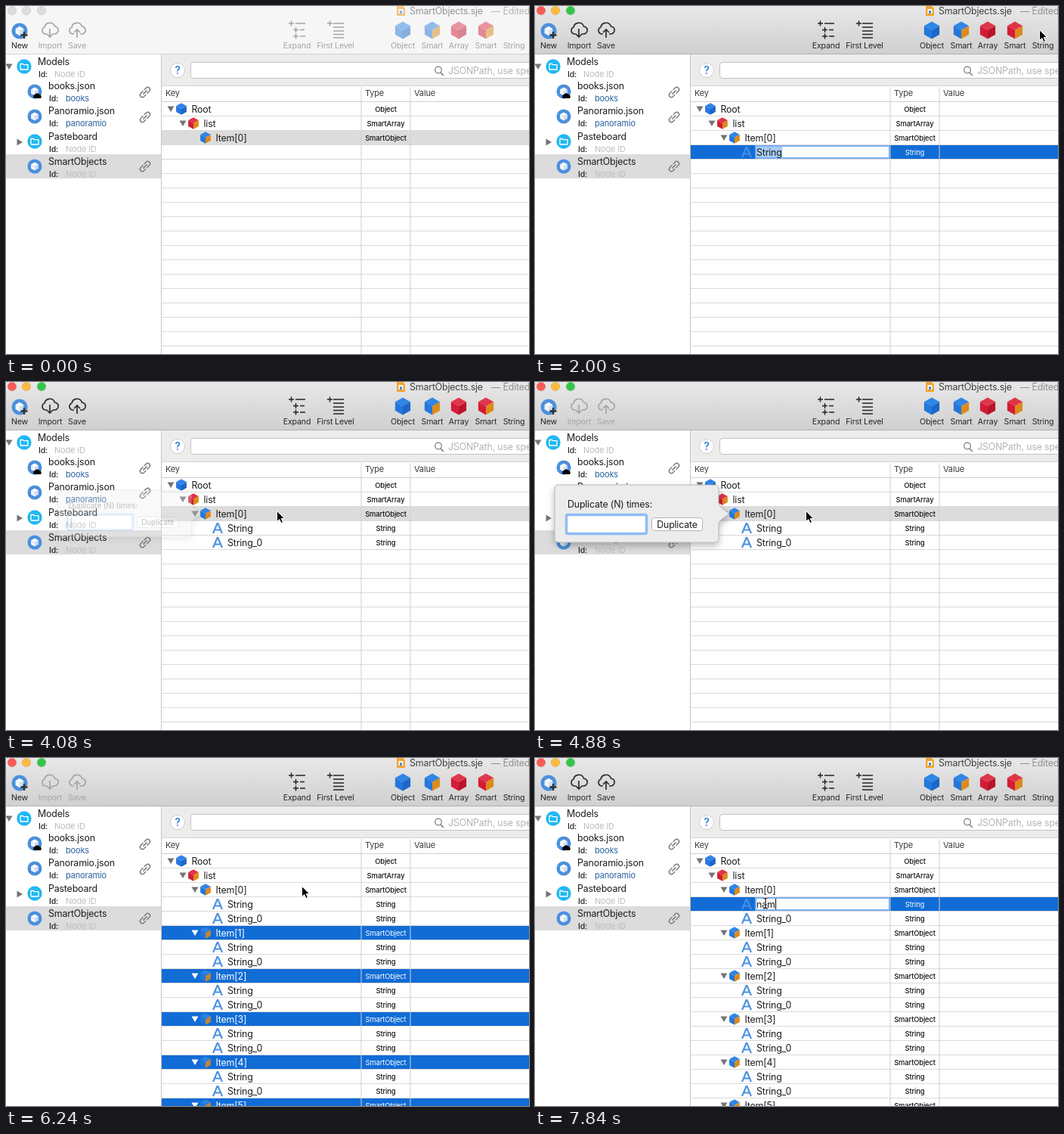
These frames come from a looping animation (692x460 px, 8 s). An HTML page:

```html
<!DOCTYPE html>
<html lang="en">
<head>
<meta charset="utf-8">
<title>Smart objects editor</title>
<style>
  html, body { margin: 0; width: 100%; height: 100%; overflow: hidden; background: #fff; }
  svg { display: block; width: 692px; height: 460px; }
  text { font-family: Inter, "Open Sans", sans-serif; letter-spacing: -.015em; white-space: pre; }
</style>
</head>
<body>
<svg id="stage" viewBox="0 0 692 460" xmlns="http://www.w3.org/2000/svg"></svg>
<script>
const LOOP = 8000, STEP = 80, ROW = 19, FIRST_ROW = 127;
const BLUE = '#116cd6', GRAY = '#dcdcdc', LETTER = '#4a90e2';
const stage = document.getElementById('stage');
const pen = document.createElement('canvas').getContext('2d');

const rect = (x, y, w, h, fill, extra = '') =>
  `<rect x="${x}" y="${y}" width="${w}" height="${h}" fill="${fill}" ${extra}/>`;
const path = (d, fill = 'none', extra = '') => `<path d="${d}" fill="${fill}" ${extra}/>`;
const stroke = (d, color, width = 1, extra = '') =>
  path(d, 'none', `stroke="${color}" stroke-width="${width}" ${extra}`);
const circle = (x, y, r, fill, extra = '') => `<circle cx="${x}" cy="${y}" r="${r}" fill="${fill}" ${extra}/>`;
const text = (x, y, s, size = 12.4, fill = '#1c1c1c', extra = '') =>
  `<text x="${x}" y="${y}" font-size="${size}" fill="${fill}" ${extra}>${s}</text>`;
const middle = 'text-anchor="middle"';
const group = (x, y, body, extra = '') => `<g transform="translate(${x} ${y})" ${extra}>${body}</g>`;

function textWidth(s, size = 12.4) {
  pen.font = `${size}px Inter, "Open Sans", sans-serif`;
  return pen.measureText(s).width - s.length * size * .015;
}

// Eased interpolation through [time, ...values] keys.
function keyed(t, keys) {
  if (t <= keys[0][0]) return keys[0].slice(1);
  for (let i = 1; i < keys.length; i++) {
    const [a, ...from] = keys[i - 1], [b, ...to] = keys[i];
    if (t < b) {
      const p = (t - a) / (b - a), e = p * p * (3 - 2 * p);
      return from.map((v, k) => v + (to[k] - v) * e);
    }
  }
  return keys[keys.length - 1].slice(1);
}

const CUBES = {
  object: ['#2f86e6', '#2477dc', '#1c66c6'],
  smart: ['#2f86e6', '#2477dc', '#dd8a1c'],
  array: ['#e0354a', '#d41c36', '#b9142c'],
  smartArray: ['#e0354a', '#d41c36', '#dd8a1c'],
  white: ['#ffffff', '#f2f6fb', '#cfe0f4']
};

function cube(x, y, r, kind, opacity = 1) {
  const [top, left, right] = CUBES[kind], w = r * .88, h = r / 2;
  return group(x, y,
    path(`M0 ${-r}L${w} ${-h}L0 0L${-w} ${-h}Z`, top) +
    path(`M${-w} ${-h}L0 0V${r}L${-w} ${h}Z`, left) +
    path(`M${w} ${-h}L0 0V${r}L${w} ${h}Z`, right), `opacity="${opacity}"`);
}

const letterA = (x, y, s) =>
  group(x, y, stroke('M-6 6.5L-.5-6.5H.5L6 6.5M-4 2H4', LETTER, 2.1), `transform-origin="0 0" style="scale:${s}"`);
const triangle = (x, y, fill = '#757575', turned = false) =>
  group(x, y, path(turned ? 'M-3.5-4.5L4 0L-3.5 4.5Z' : 'M-4.5-3.5H4.5L0 4Z', fill));
const nodeIcon = (x, y, r = 9.5) => circle(x, y, r, '#4a8fdd') + cube(x, y, r * .59, 'white');
const folderIcon = (x, y) => circle(x, y, 9.7, '#21b8f2') +
  group(x, y, stroke('M-5-3.5H-1.5L-.5-2.3H5V4H-5Z', '#fff', 1.3, 'stroke-linejoin="round"'));
const linkIcon = (x, y) => group(x, y,
  `<g transform="rotate(-45)">${stroke('M-1-3H-5A3 3 0 0 0-5 3H-2M1 3H5A3 3 0 0 0 5-3H2M-3 0H3', '#7d7d7d', 1.5, 'stroke-linecap="round"')}</g>`);

function cloud(x, up, color) {
  const arrow = up ? 'M0 10V-1M-4 3L0-1L4 3' : 'M0-2V9M-4 5L0 9L4 5';
  return group(x, 32, stroke('M-4 5H-6A4.7 4.7 0 0 1-7-4A7 7 0 0 1 6.5-5A5 5 0 0 1 6 5H4', color, 1.7) +
    stroke(arrow, color, 1.7));
}

function toolbar(active, enabled) {
  const ink = active ? '#252525' : '#a5a5a5';
  const fileInk = active && enabled ? '#2d2d2d' : '#a5a5a5';
  const label = (x, s, color = ink) => text(x, 56, s, 10.6, color, middle);
  const lights = active ? ['#fc5b57', '#fdb93e', '#34c648'] : ['#dcdcdc', '#dcdcdc', '#dcdcdc'];
  const icons = [[525, 'object', 'Object'], [564, 'smart', 'Smart'], [599, 'array', 'Array'], [635, 'smartArray', 'Smart']];
  const dim = active ? 1 : .5;
  return rect(0, 0, 692, 63, active ? 'url(#bar)' : '#f6f6f6') +
    rect(0, 63, 692, 1, active ? '#b2b2b2' : '#d1d1d1') +
    lights.map((c, i) => circle([8, 27, 47][i], 6, 5.8, c, 'stroke="#000" stroke-opacity=".12" stroke-width=".7"')).join('') +
    `<g opacity="${active ? 1 : .6}">` + path('M517 0H525L528 3V13H517Z', '#f2a431') +
      rect(519.5, 4, 6, 6, '#fff') + rect(521, 6, 3, 4, '#4a8fdd') + '</g>' +
    text(534, 11, 'SmartObjects.sje', 12.4, active ? '#404040' : '#959595') +
    text(642, 11, '— Edited', 12.4, active ? '#8f8f8f' : '#b5b5b5') +
    nodeIcon(18, 33, 10.5) + stroke('M24 34V43M19.5 38.5H28.5', '#333', 2.4) +
    label(18, 'New', '#252525') +
    cloud(58, false, fileInk) + label(58.5, 'Import', fileInk) +
    cloud(94, true, fileInk) + label(94, 'Save', fileInk) +
    stroke('M374 23H381M377.5 19.5V26.5M383 23H396M380 31.5H387M383.5 28V35M389 31.5H395M380 40H387M383.5 36.5V43.5M389 40H396', ink, 1.5) +
    label(385, 'Expand') +
    stroke('M425 23H432M428.5 19.5V26.5M433 23H447M433 28H447M433 33H447M433 37.5H447M433 42H447', ink, 1.5) +
    label(436, 'First Level') +
    `<g opacity="${dim}">` + icons.map(([x, kind]) => cube(x, 32, 11.5, kind)).join('') + letterA(672, 32, 1.5) + '</g>' +
    icons.map(([x, , s]) => label(x, s)).join('') + label(672, 'String');
}

function sidebar() {
  const entry = (x, y, name, id) => text(x, y, name) +
    text(x === 42 ? 43 : 57, y + 16, 'Id:', 10.6, '#222', 'font-weight="500"') +
    text(x === 42 ? 64 : 79, y + 16, id || 'Node ID', 11, id ? '#27619f' : '#bdbdbd');
  return rect(0, 64, 205, 396, '#fff') + rect(0, 196, 205, 32, GRAY) +
    triangle(4, 80) + folderIcon(24, 80) + entry(42, 77.5, 'Models') +
    nodeIcon(38, 113) + entry(56, 109.5, 'books.json', 'books') +
    path('M37 122A3 3 0 0 1 38 117A4 4 0 0 1 44.500 117A3 3 0 0 1 46 122Z', '#000') +
    nodeIcon(38, 146) + entry(56, 143, 'Panoramio.json', 'panoramio') +
    triangle(18, 180, '#757575', true) + folderIcon(38, 179) + entry(56, 176.5, 'Pasteboard') +
    nodeIcon(38, 212) + entry(56, 209.5, 'SmartObjects') +
    [114, 147, 212].map(y => linkIcon(184, y)).join('') + rect(205, 64, 1, 396, '#c6c6c6');
}

function searchAndHeader() {
  return rect(206, 64, 486, 41, '#ececec') + rect(206, 105, 486, 22, '#fff') +
    circle(227, 85, 9.5, '#fff', 'stroke="#c4c4c4" stroke-width=".8"') +
    text(227, 90, '?', 14, '#1d76dc', middle + ' font-weight="500"') +
    rect(244.5, 74.5, 470, 21, '#fff', 'rx="4" stroke="#c2c2c2"') +
    circle(572, 84.5, 4.3, 'none', 'stroke="#777" stroke-width="1.2"') + stroke('M575 88L579 92', '#777', 1.4) +
    text(585, 90, 'JSONPath, use special', 12.4, '#b4b4b4') +
    rect(206, 105, 486, 1, '#d5d5d5') + rect(206, 126, 486, 1, '#cfcfcf') +
    [[211, 'Key'], [475, 'Type'], [540, 'Value']].map(([x, s]) => text(x, 119, s, 11, '#3c3c3c')).join('');
}

function outline(t) {
  const rows = [['Root', 0, 'object', 'Object'], ['list', 1, 'smartArray', 'SmartArray']];
  const items = t >= 5680 ? 6 : 1;
  for (let i = 0; i < items; i++) {
    rows.push([`Item[${i}]`, 2, 'smart', 'SmartObject']);
    if (t >= 1760) rows.push(['String', 3, null, 'String']);
    if (t >= 2080) rows.push(['String_0', 3, null, 'String']);
  }
  return rows;
}

function selection(t) {
  if (t < 80) return { rows: [2], color: GRAY };
  if (t < 1760) return { rows: [2], color: BLUE };
  if (t < 2080) return { rows: [3], color: BLUE, edit: 'String', marked: true };
  if (t < 3040) return { rows: [4], color: BLUE, edit: 'String_0', marked: true };
  if (t < 3920) return { rows: [2], color: BLUE };
  if (t < 5680) return { rows: [2], color: GRAY };
  if (t < 6640) return { rows: [5, 8, 11, 14, 17], color: BLUE };
  if (t < 7040) return { rows: [3], color: BLUE };
  const typed = Math.floor((t - 7600) / STEP);
  return typed < 1
    ? { rows: [3], color: BLUE, edit: 'String', marked: true }
    : { rows: [3], color: BLUE, edit: 'name'.slice(0, Math.min(typed, 3)) };
}

function editor(y, { edit, marked }) {
  const w = textWidth(edit);
  return rect(292, y + 1, 177, 16, '#fff', 'stroke="#79aef0" stroke-width="2"') +
    (marked ? rect(293, y + 2, w + .5, 14, '#a8cdf8') : rect(293.5 + w, y + 2, 1, 14, '#000')) +
    text(293, y + 13.5, edit);
}

function table(t) {
  const chosen = selection(t);
  let out = rect(206, 127, 486, 333, '#fff');
  for (let y = FIRST_ROW + 18; y < 460; y += ROW) out += rect(206, y, 486, 1, '#dadada');
  chosen.rows.forEach(i => { out += rect(206, FIRST_ROW + i * ROW, 486, 18, chosen.color); });
  out += [470, 535].map(x => rect(x - .5, 107, 1, 353, '#cfcfcf')).join('');
  outline(t).forEach(([name, level, kind, type], i) => {
    const y = FIRST_ROW + i * ROW, x = 218 + level * 16;
    const lit = chosen.color === BLUE && chosen.rows.includes(i);
    const ink = lit ? '#fff' : '#1c1c1c';
    if (kind && (level < 2 || t >= 1760)) out += triangle(x, y + 9, lit ? '#fff' : '#757575');
    out += kind ? cube(x + 14, y + 9, 7.8, kind, lit ? .85 : 1) : letterA(280, y + 9.5, 1);
    out += lit && chosen.edit ? editor(y, chosen) : text(x + 27 + (level === 3 ? 0 : .5), y + 13.5, name, 12.4, ink);
    out += text(502.5, y + 12.5, type, 9.4, lit ? '#fff' : '#111', middle + (lit ? '' : ' font-weight="500"'));
  });
  return out;
}

function popover(t) {
  if (t < 3920 || t >= 5920) return '';
  const [scale, opacity] = keyed(t, [
    [3840, .6, 0], [4080, .815, .27], [4160, .97, .65], [4240, 1.04, 1], [4320, 1, 1], [5680, 1, .75], [5920, 1, 0]
  ].filter(k => t < 5680 ? k[0] < 5000 : k[0] > 5000));
  const value = t < 4960 ? '' : t < 5200 ? '1' : '10';
  const caret = t < 4480 || t >= 4960;
  const body = path('M31 136H238A5 5 0 0 1 243 141V160C244 166 251 169 257 174C251 179 244 182 243 188V207A5 5 0 0 1 238 212H31A5 5 0 0 1 26 207V141A5 5 0 0 1 31 136Z',
      '#ececec', 'stroke="#a9a9a9" stroke-width=".8" filter="url(#shadow)"') +
    text(43, 165.5, 'Duplicate (N) times:') +
    rect(41.5, 175.500, 106, 25, '#fff', 'rx="2" stroke="#8dbdf5" stroke-width="3.4"') +
    text(47, 192.5, value) + (caret ? rect(47 + textWidth(value), 180, 1, 17, '#111') : '') +
    rect(154.5, 179.5, 67, 17, '#fff', 'rx="3" stroke="#b5b5b5"') + text(188, 192.5, 'Duplicate', 12.4, '#1c1c1c', middle);
  return `<g opacity="${opacity}" transform="translate(257 174) scale(${scale}) translate(-257 -174)">${body}</g>`;
}

function cursor(t) {
  if (t < 80) return '';
  const [x, y] = keyed(t, [
    [80, 590, 386], [720, 420, 170], [960, 420, 170], [1280, 658, 33], [1360, 658, 33], [1600, 667, 31],
    [2160, 667, 31], [2640, 422, 134], [3040, 358, 170], [5680, 358, 170], [6000, 387, 170], [6160, 387, 170],
    [6240, 391, 169], [6320, 391, 169], [6720, 309, 188], [7040, 305, 192]
  ]);
  if (t >= 7040) {
    const beam = 'M-3-7Q0-7 0-5Q0-7 3-7M0-5V5M-3 7Q0 7 0 5Q0 7 3 7M-1.500 2H1.5';
    return group(x, y, stroke(beam, '#fff', 2.4) + stroke(beam, '#111', 1.2));
  }
  return group(x, y, path('M.5.5V14.5L3.7 11.5L6 16.500L8.500 15.5L6.200 10.500H10.500Z', '#000',
    'stroke="#fff" stroke-width="1" stroke-linejoin="round"'));
}

const DEFS = `<defs>
  <linearGradient id="bar" x2="0" y2="1"><stop stop-color="#e8e8e8"/><stop offset="1" stop-color="#d0d0d0"/></linearGradient>
  <filter id="shadow" x="-20%" y="-30%" width="140%" height="170%">
    <feDropShadow dx="0" dy="4" stdDeviation="5" flood-color="#000" flood-opacity=".28"/></filter>
</defs>`;

function draw(t) {
  const active = t >= 80;
  const enabled = t >= 720 && (t < 4320 || t >= 6640);
  stage.innerHTML = DEFS + sidebar() + searchAndHeader() + table(t) +
    toolbar(active, enabled) + popover(t) + cursor(t);
}

const start = performance.now();
let shown = -1;
function tick() {
  const elapsed = Math.max(0, performance.now() - start) % LOOP;
  const t = Math.floor(elapsed / STEP) * STEP;
  if (t !== shown) draw(shown = t);
  requestAnimationFrame(tick);
}
tick();
</script>
</body>
</html>
```
